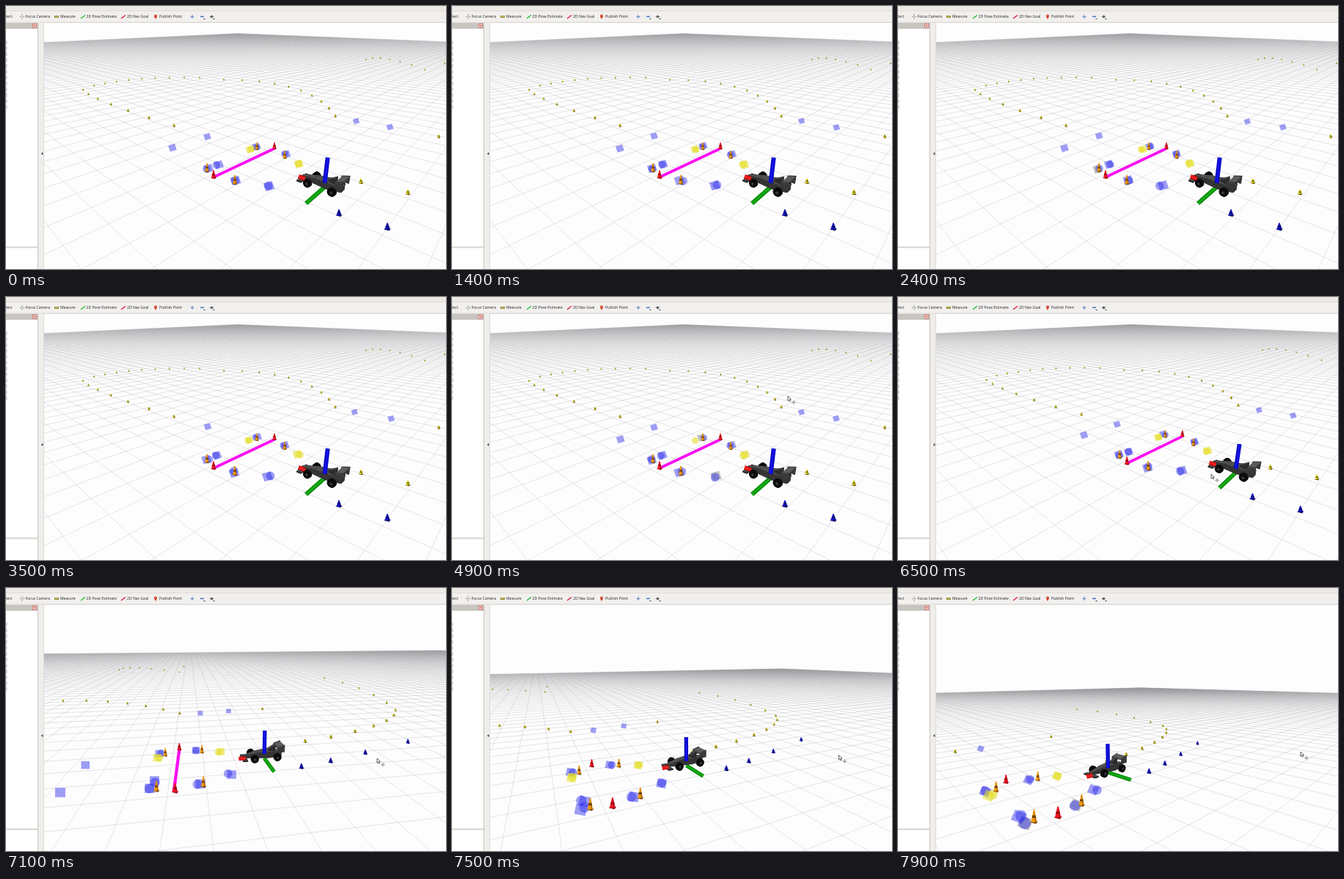
Recreate the animation shown at these times as an HTML page with a canvas. Size 600 px wide and 358 px high, loop 8000 ms.

```html
<!DOCTYPE html>
<html lang="en">
<head>
<meta charset="utf-8">
<title>Track view</title>
<style>
html, body { margin: 0; width: 100%; height: 100%; overflow: hidden; background: #fff; }
canvas { display: block; }
</style>
</head>
<body>
<canvas id="stage"></canvas>
<script>
const W = 600, H = 358, LOOP = 8000, F = 405, CX = 326, CY = 190;
const stage = document.getElementById('stage'), ctx = stage.getContext('2d');
const ratio = window.devicePixelRatio || 1;
stage.width = W * ratio;
stage.height = H * ratio;
stage.style.width = W + 'px';
stage.style.height = H + 'px';

// Time, then: car to the right, car ahead, car heading (deg), pitch (deg), eye height
const camKeys = [
  [5500, 3.08, 10.02, 140, 22.9, 6],
  [6300, 3.95, 10.44, 140, 22.9, 6],
  [6500, 3.95, 10.44, 140, 22.9, 6],
  [7100, .85, 12.2, 192.5, 16.8, 5.1],
  [7900, -1.27, 12.55, 226, 9.1, 4]
];
const cursorKeys = [
  [4600, 580, 101], [4900, 459, 136], [5300, 401, 251], [5500, 401, 251],
  [6300, 428, 242], [6500, 428, 242], [7100, 507, 233], [7900, 550, 224]
];

function sample(keys, t) {
  let i = 0;
  while (i < keys.length - 2 && t > keys[i + 1][0]) i++;
  const a = keys[i], b = keys[i + 1];
  const k = Math.min(1, Math.max(0, (t - a[0]) / (b[0] - a[0])));
  return a.slice(1).map((v, j) => v + (b[j + 1] - v) * k);
}

function camera(t) {
  const [right, ahead, heading, pitch, eye] = sample(camKeys, t);
  const h = heading * Math.PI / 180, p = pitch * Math.PI / 180;
  return { right, ahead, eye, ch: Math.cos(h), sh: Math.sin(h), cp: Math.cos(p), sp: Math.sin(p) };
}

let cam;
// World axes: x forward of the car, y to its left, z up
function view(x, y, z = 0) {
  const r = cam.right + x * cam.ch - y * cam.sh;
  const g = cam.ahead + x * cam.sh + y * cam.ch;
  const e = cam.eye - z;
  return [r, e * cam.cp - g * cam.sp, g * cam.cp + e * cam.sp];
}
const flat = ([r, v, d]) => [CX + F * r / d, CY + F * v / d, d];
const project = (x, y, z) => flat(view(x, y, z));

// Ground point seen at a pixel
function ground(px, py, c) {
  const v = py - CY, q = F * c.sp + v * c.cp;
  const r = c.eye * (px - CX) / q - c.right;
  const g = c.eye * (F * c.cp - v * c.sp) / q - c.ahead;
  return [r * c.ch + g * c.sh, g * c.ch - r * c.sh];
}

const wide = camera(0), side = camera(7100);

// n ground points along a curve drawn in a camera's picture
function row(c, n, a, b, mid = [(a[0] + b[0]) / 2, (a[1] + b[1]) / 2]) {
  return Array.from({ length: n }, (_, i) => {
    const t = i / (n - 1), s = 1 - t;
    const [x, y] = [0, 1].map(k => s * s * a[k] + 2 * s * t * mid[k] + t * t * b[k]);
    return ground(x, y, c);
  });
}

const kinds = {
  yellow: { color: '#e4d810', band: '#4a4600', height: .18, radius: .1 },
  blue: { color: '#1212c8', band: '#08085a', height: .2, radius: .11 },
  orange: { color: '#f09a10', band: '#704000', height: .36, radius: .11, big: true },
  red: { color: '#f01420', band: '#900810', height: .32, radius: .12, big: true }
};
const cones = [];
const plant = (kind, ...curve) => row(...curve).forEach(at => cones.push({ kind: kinds[kind], at }));
plant('yellow', wide, 7, [229, 164], [105, 115], [119, 130]);
plant('yellow', wide, 9, [120, 109], [264, 98], [178, 96]);
plant('yellow', wide, 10, [297, 101], [449, 151], [415, 100]);
plant('yellow', wide, 7, [491, 73], [571, 87], [515, 66]);
plant('yellow', wide, 2, [484, 241], [548, 256]);
plant('yellow', wide, 2, [590, 179], [598, 78]);
plant('yellow', side, 6, [443, 204], [531, 167], [535, 185]);
plant('yellow', side, 5, [519, 157], [434, 123], [486, 134]);
plant('blue', wide, 2, [454, 285], [520, 304]);
plant('blue', side, 2, [490, 226], [548, 211]);
plant('orange', wide, 2, [274, 225], [312, 242]);
plant('orange', wide, 2, [342, 195], [380, 207]);
plant('red', wide, 2, [283, 234], [366, 194]);
const gate = row(wide, 2, [283, 233], [366, 194]);

const markers = [];
const detect = (hue, disc, ...curve) => row(...curve).forEach(at => markers.push({ hue, disc, at }));
detect('blue', false, wide, 2, [229, 193], [275, 177]);
detect('blue', false, wide, 2, [477, 157], [525, 165]);
detect('blue', true, wide, 2, [274, 221], [312, 238]);
detect('blue', true, wide, 2, [342, 191], [380, 202]);
detect('blue', true, wide, 2, [288, 216], [359, 244]);
detect('yellow', true, wide, 2, [332, 195], [398, 215]);
const tint = { blue: 'rgba(40,40,235,.45)', yellow: 'rgba(228,222,40,.6)', grey: 'rgba(120,120,120,.45)' };

function rnd(a, b) {
  const s = Math.sin(a * 127.1 + b * 311.7) * 43758.5453;
  return s - Math.floor(s);
}
function poly(pts, fill) {
  ctx.beginPath();
  pts.forEach(p => ctx.lineTo(p[0], p[1]));
  ctx.closePath();
  ctx.fillStyle = fill;
  ctx.fill();
}
function rect(x, y, w, h, fill) {
  ctx.fillStyle = fill;
  ctx.fillRect(x, y, w, h);
}
function seg(points, color, width) {
  ctx.beginPath();
  points.forEach(p => ctx.lineTo(p[0], p[1]));
  ctx.strokeStyle = color;
  ctx.lineWidth = width;
  ctx.stroke();
}
function disc(x, y, r, fill) {
  ctx.beginPath();
  ctx.arc(x, y, r, 0, 7);
  ctx.fillStyle = fill;
  ctx.fill();
}
function plus(x, y, r, color) {
  seg([[x - r, y], [x + r, y]], color, 1.2);
  seg([[x, y - r], [x, y + r]], color, 1.2);
}

function drawGrid() {
  const half = 100, cells = 75, near = .5, c = Math.cos(-.04), s = Math.sin(-.04);
  const spot = (x, y) => view(x * c - y * s, x * s + y * c);
  const cut = (p, q) => p[2] >= near ? p : p.map((v, i) => v + (q[i] - v) * (near - p[2]) / (q[2] - p[2]));
  const line = (a, b) => {
    if (a[2] < near && b[2] < near) return;
    ctx.moveTo(...flat(cut(a, b)).slice(0, 2));
    ctx.lineTo(...flat(cut(b, a)).slice(0, 2));
  };
  ctx.beginPath();
  for (let i = -cells; i <= cells; i++) {
    const k = i * half / cells;
    line(spot(k, -half), spot(k, half));
    line(spot(-half, k), spot(half, k));
  }
  ctx.strokeStyle = 'rgba(150,150,154,.5)';
  ctx.lineWidth = .5;
  ctx.stroke();
}

function drawCone({ kind, at }) {
  const [x, y, d] = project(...at);
  if (d < 1) return;
  const h = kind.height * F / d, r = Math.max(1.2, kind.radius * F / d);
  const edge = (k, sign) => [x + sign * r * .75 * (1 - k * .8), y - h * k];
  const slice = (lo, hi, color) => poly([edge(lo, -1), edge(hi, -1), edge(hi, 1), edge(lo, 1)], color);
  poly([[x - r, y], [x - r * .3, y - r * .5], [x + r, y - r * .2], [x + r * .5, y + r * .4]], kind.band);
  slice(0, 1, kind.color);
  slice(.35, .55, kind.band);
  poly([[x + r * .2, y], [x + r * .1, y - h], [x + r * .7, y]], kind.band + '80');
}

function drawMarker(at, hue, round) {
  const [x, y, d] = project(...at);
  if (d < 1) return;
  const s = F / d;
  if (round) return disc(x, y, .17 * s, tint[hue]);
  const turn = -.3 + (.389 - cam.sp) * 3, k = .25 * s;
  poly([1, 3, 5, 7].map(i => {
    const a = turn + i * Math.PI / 4;
    return [x + k * Math.cos(a), y + k * .92 * Math.sin(a)];
  }), tint[hue]);
}

// Detections jitter anew on every tick
function drawMarkers(tick) {
  markers.forEach(({ hue, disc, at }, i) => {
    const nudge = n => at.map((v, j) => v + (rnd(tick + n * 7, i * 4 + j + n) - .5) * .17);
    const stale = disc && hue === 'blue' && rnd(tick, i + 9) < .15;
    if (rnd(tick, i + 5) > .05) drawMarker(nudge(1), stale ? 'grey' : hue, false);
    if (disc) drawMarker(nudge(2), hue, true);
  });
}

function carFaces() {
  const faces = [], size = .82;
  const add = (pts, fill) => faces.push({ pts: pts.map(p => project(...p.map(v => v * size))), fill });
  // Solid between two upright rectangles: [x, half width, bottom, top, middle y]
  const solid = (a, b, tone) => {
    const ring = ([x, w, lo, hi, y = 0]) => [[x, y - w, lo], [x, y + w, lo], [x, y + w, hi], [x, y - w, hi]];
    const p = ring(a), q = ring(b), grey = k => `rgb(${tone + k},${tone + k},${tone + k})`;
    [-12, -6, 22, -16].forEach((k, i) => {
      const j = (i + 1) % 4;
      add([p[i], p[j], q[j], q[i]], grey(k));
    });
    add(p, grey(0));
    add(q, grey(-8));
  };
  const body = [[1.2, .08, .15, .26], [.45, .2, .13, .42], [-.2, .3, .13, .46], [-.9, .18, .15, .4]];
  body.slice(1).forEach((s, i) => solid(body[i], s, 58));
  solid([1.25, .45, .08, .14], [1, .45, .08, .14], 48);
  solid([-.2, .09, .44, .55], [-.55, .12, .4, .74], 50);
  solid([-.65, .36, .62, .68], [-.98, .36, .72, .78], 70);
  for (const s of [-1, 1]) {
    solid([-.62, .015, .42, .7, s * .37], [-1, .015, .42, .82, s * .37], 62);
    for (const x of [.65, -.58]) {
      const wheel = (w, r) => Array.from({ length: 14 }, (_, i) =>
        [x + r * Math.cos(i * Math.PI / 7), s * w, .2 + r * Math.sin(i * Math.PI / 7)]);
      const a = wheel(.54, .2), b = wheel(.4, .2);
      a.forEach((p, i) => add([p, a[(i + 1) % 14], b[(i + 1) % 14], b[i]], '#101010'));
      add(a, '#0a0a0a');
      add(b, '#0a0a0a');
      add(wheel(.55, .07), '#3a3a3a');
    }
  }
  const depth = f => f.pts.reduce((sum, p) => sum + p[2], 0) / f.pts.length;
  return faces.sort((a, b) => depth(b) - depth(a));
}

function axis(from, to, color, light) {
  const ends = [project(...from), project(...to)], w = .17 * F / ends[0][2];
  seg(ends, color, w);
  seg(ends, light, w * .3);
}

function drawCar() {
  axis([0, 0, 0], [0, 1.42, 0], '#0a900a', '#18b418');
  carFaces().forEach(f => poly(f.pts, f.fill));
  axis([.85, 0, .08], [1.15, 0, .08], '#d81010', '#f02a2a');
  axis([0, 0, .2], [0, 0, 1.28], '#0808c8', '#1616ee');
}

function drawScene(t) {
  cam = camera(t);
  rect(52, 22, 548, 336, '#fefdfe');
  ctx.save();
  ctx.beginPath();
  ctx.rect(52, 22, 548, 336);
  ctx.clip();
  drawGrid();
  const far = project(0, 0)[2], depth = c => project(...c.at)[2];
  const sorted = [...cones].sort((a, b) => depth(b) - depth(a));
  const behind = c => depth(c) >= far;
  sorted.filter(c => behind(c) && !c.kind.big).forEach(drawCone);
  drawMarkers(t / 100);
  if (t < 7500) {
    const [a, b] = gate.map(p => project(...p));
    seg([a, b], '#f810f0', .13 * F / ((a[2] + b[2]) / 2));
  }
  sorted.filter(c => behind(c) && c.kind.big).forEach(drawCone);
  drawCar();
  sorted.filter(c => !behind(c)).forEach(drawCone);
  ctx.restore();
}

function drawCursor(t) {
  if (t < cursorKeys[0][0]) return;
  const [x, y] = sample(cursorKeys, t);
  const arrow = [[0, 0], [0, 6.2], [1.5, 5], [2.5, 7], [3.5, 6.5], [2.6, 4.5], [4.4, 4.4]];
  const pts = arrow.map(([a, b]) => [x - 1 + a, y - 1 + b]);
  poly(pts, '#fff');
  seg([...pts, pts[0]], '#222', .7);
  plus(x + 7, y + 7.5, 2.8, '#999');
}

function drawToolbar() {
  rect(0, 0, W, 23, '#f2f0ee');
  rect(0, 0, W, 6.5, '#edeae6');
  rect(0, 6.5, W, .7, '#d5d1cc');
  rect(0, 21.8, W, .8, '#cbc7c2');
  ctx.font = '5.1px "Open Sans", sans-serif';
  ctx.textBaseline = 'middle';
  ctx.fillStyle = '#222';
  [['lect', 0], ['Focus Camera', 26.5], ['Measure', 74], ['2D Pose Estimate', 109.5],
    ['2D Nav Goal', 165], ['Publish Point', 209]].forEach(([s, x]) => ctx.fillText(s, x, 15));
  plus(22, 14.5, 3.2, '#999');
  disc(22, 14.5, 1.4, '#d8d8d8');
  rect(66, 13, 6, 3, '#8c8630');
  rect(67, 13.6, 4, 1.2, '#d8d070');
  seg([[102, 17], [108, 12.5]], '#20c030', 1.5);
  seg([[157, 17], [163, 12.5]], '#e02040', 1.5);
  disc(204, 13.5, 2, '#d03018');
  poly([[202.2, 14.2], [205.8, 14.2], [204, 18]], '#d03018');
  disc(204, 13.3, .7, '#f8d8c8');
  plus(254, 14.5, 2.4, '#6a8cc8');
  rect(265, 13.6, 5, 1.6, '#4a78c8');
  disc(280.5, 14.5, 1.8, '#555');
  seg([[277.5, 14.5], [283.5, 14.5]], '#777', .7);
  for (const x of [269, 282]) poly([[x, 17], [x + 3, 17], [x + 1.5, 18.5]], '#444');
}

function drawPanel() {
  rect(0, 22.6, 52, 336, '#f0eeeb');
  rect(0, 23, 43.5, 8, '#c8c4c0');
  rect(0, 31, 43, 297, '#fff');
  rect(0, 327.5, 43, 2, '#d4d0cb');
  rect(0, 329.5, 43, 29, '#fff');
  rect(43, 23, .8, 335, '#bdb9b4');
  rect(51.3, 22.6, .7, 336, '#d6d2ce');
  rect(36, 23.8, 6, 6, '#d06860');
  rect(36.8, 24.6, 4.4, 4.4, '#f6e4e0');
  seg([[37.8, 25.6], [40.2, 28]], '#c03028', .8);
  seg([[40.2, 25.6], [37.8, 28]], '#c03028', .8);
  for (let y = 47; y < 138; y += 8) rect(0, y, 1.4, 5, '#c8c8c8');
  poly([[48, 201], [50.3, 199], [50.3, 203]], '#333');
}

function draw(now) {
  const t = Math.floor(now % LOOP / 100) * 100;
  ctx.setTransform(ratio, 0, 0, ratio, 0, 0);
  drawScene(t);
  drawToolbar();
  drawPanel();
  drawCursor(t);
}

let start;
function loop(now) {
  start ??= now;
  draw(now - start);
  requestAnimationFrame(loop);
}
draw(0);
requestAnimationFrame(loop);
</script>
</body>
</html>
```
